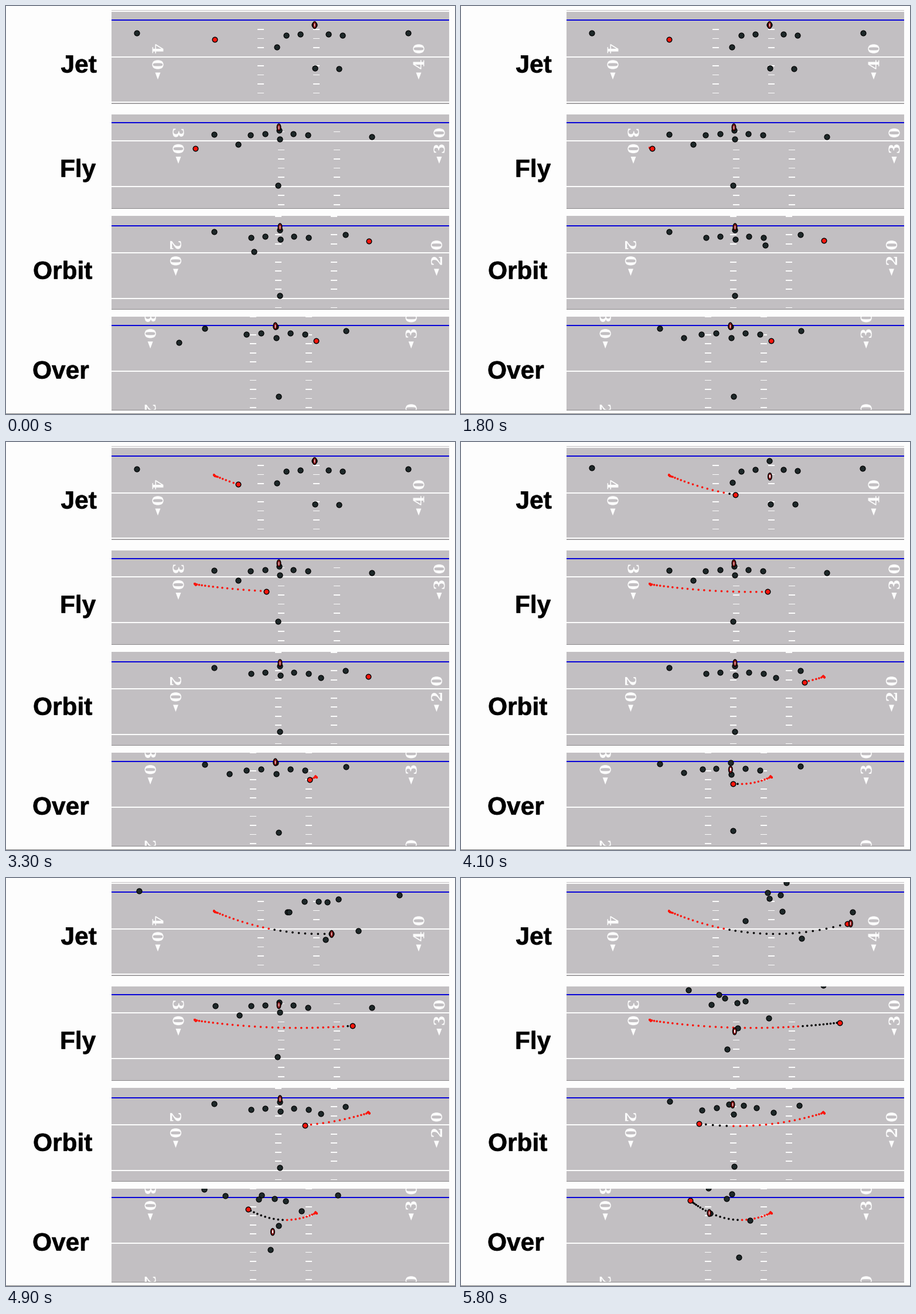
A matplotlib script that plays this animation: 766 by 696 pixels, repeating every 5.9 s.

```python
import numpy as np
import matplotlib.pyplot as plt
from matplotlib.animation import FuncAnimation
from matplotlib.patches import Ellipse, PathPatch, Polygon, Rectangle
from matplotlib.textpath import TextPath
from matplotlib.transforms import Affine2D

W, H, DPI = 766, 696, 64
FRAMES, INTERVAL = 59, 100
PT = 72 / DPI                      # points per pixel
LEFT, RIGHT = 179, 755
YARDS5 = 77.6                      # pixels between yard lines
GRASS, CHALK, BLUE = "#c2bfc2", "#fcfcfc", "#0a06d8"
RED, DARK, BROWN = "#fb160c", "#1e2829", "#8a1a1c"
SERIF = dict(family="DejaVu Serif", weight="bold")
SANS = dict(family="Liberation Sans", weight="bold")

plt.rcParams["toolbar"] = "None"
fig = plt.figure(figsize=(W / DPI, H / DPI), dpi=DPI, facecolor="#fdfdfd")
ax = fig.add_axes([0, 0, 1, 1])
ax.set(xlim=(-0.5, W - 0.5), ylim=(H - 0.5, -0.5))   # integers are pixel centres
ax.axis("off")


def add(patch, clip=None):
    ax.add_patch(patch)
    if clip is not None:
        patch.set_clip_path(clip)
    return patch


def box(x0, y0, x1, y1, color, z=1, clip=None):
    return add(Rectangle((x0, y0), x1 - x0, y1 - y0, fc=color, lw=0, zorder=z), clip)


def label(text, x, y):
    path = TextPath((0, 0), text, size=42.4, prop=SANS)
    tr = Affine2D().scale(1, -1).translate(x, y)
    add(PathPatch(path.transformed(tr), fc="black", ec="black", lw=0.7 * PT))


def digit(ch, x, y, angle, clip):
    path = TextPath((0, 0), ch, size=25.5, prop=SERIF)
    e = path.get_extents()
    tr = (Affine2D().translate(-(e.x0 + e.x1) / 2, -(e.y0 + e.y1) / 2)
          .scale(1, -1).rotate_deg(angle).translate(x, y))
    add(PathPatch(path.transformed(tr), fc=CHALK, lw=0, zorder=2), clip)


def arc(a, b, s, bow):
    """Points from a to b at progress s, sagging by bow halfway."""
    s = np.asarray(s)[..., None]
    return np.array(a) + s * np.subtract(b, a) + 4 * s * (1 - s) * np.array([0, bow])


class Play:
    def __init__(self, name, name_x, base, top, bottom, los, line, left, yard, snap):
        self.snap, self.men = snap, []
        label(name, name_x, base)
        self.clip = box(LEFT, top, RIGHT, bottom, GRASS, 0)
        self.field(top, bottom, line, left, yard)
        box(LEFT, los - 1, RIGHT, los + 1, BLUE, 3, self.clip)
        box(LEFT, bottom - 1, RIGHT, bottom, "#8c8a8c", 3)

        self.trail = self.dots(3.6, 0, 4)
        self.team = self.dots(9, 1.2, 5, DARK)
        self.runner = self.dots(8.6, 1.4, 6, RED)
        self.ball = add(Ellipse((0, 0), 6.6, 12, fc=BROWN, ec="black", lw=1.4 * PT,
                                zorder=7), self.clip)
        self.lace = box(0, 0, 1.4, 5, "white", 8, self.clip)

    def field(self, top, bottom, line, left, yard):
        for n in range(-15, 16):
            y = line + n * YARDS5 / 5
            if n % 5 == 0:
                box(LEFT, y - 1, RIGHT, y + 1, CHALK, 1, self.clip)
            elif top - 2 < y < bottom + 2:
                for x in (left + 175, left + 270):
                    box(x - 5.5, y - 0.9, x + 5.5, y + 0.9, CHALK, 1, self.clip)
        for k in (0, 1):
            y, tens = line + 2 * k * YARDS5, str(yard // 10 - k)
            for x, text, angle in ((left, tens + "0", 90), (left + 445, "0" + tens, -90)):
                digit(text[0], x, y - 13.5, angle, self.clip)
                digit(text[1], x, y + 13.5, angle, self.clip)
                add(Polygon([(x - 4.5, y + 27), (x + 4.5, y + 27), (x, y + 39)],
                            fc=CHALK, lw=0, zorder=2), self.clip)

    def dots(self, size, edge, z, color="black"):
        s = ax.scatter([], [], s=(size * PT) ** 2, c=color, linewidths=edge * PT,
                       edgecolors="black" if edge else "none", zorder=z)
        s.set_clip_path(self.clip)
        return s

    def man(self, spot, end, came_from=None, shift=1, bow=0):
        """Optional shift into the spot, then a burst towards end at the snap."""
        self.men.append((spot, end, came_from or spot, shift, bow))

    def line(self, cx, cy, gap, drop, ends):
        for k, end in zip(range(-2, 3), ends):
            depth = drop + 2 * (abs(k) - 1) if k else 0
            self.man((cx + k * gap, cy + depth), end)

    def motion(self, start, a, b, bow, ramp, tire=1e6):
        """Runner speeds up over ramp frames and fades after tire frames."""
        n = np.arange(FRAMES)
        t = np.maximum(n - start - 0.5, 0)
        dist = np.cumsum((1 - np.exp(-t / ramp)) * np.exp(-(t / tire) ** 3))
        s = dist / dist[-1]
        fidget = np.sin(n / 3)[:, None] * (s < 0.01)[:, None]
        self.path = arc(a, b, s, bow) + fidget

    def kick(self, *keys):
        t, x, y = np.transpose(keys)
        n = np.arange(FRAMES)
        self.ball_path = np.column_stack([np.interp(n, t, x), np.interp(n, t, y)])

    def place(self, man, n):
        spot, end, came_from, shift, bow = man
        u = min(n / shift, 1)
        burst = (max(n - self.snap + 1, 0) / (FRAMES - self.snap)) ** 1.7
        return arc(came_from, spot, u * u * (3 - 2 * u), bow) + burst * np.subtract(end, spot)

    def draw(self, n):
        self.team.set_offsets([self.place(m, n) for m in self.men])
        self.runner.set_offsets(self.path[n:n + 1])
        self.trail.set_offsets(self.path[:n + 1])
        self.trail.set_facecolor([RED if i < self.snap else "black" for i in range(n + 1)])
        x, y = self.ball_path[n]
        self.ball.set_center((x, y))
        self.lace.set_xy((x - 0.7, y - 2.5))


jet = Play("Jet", 93, 113, 6.5, 166.5, 23.2, 86, 258.5, 40, 40)
jet.line(525.5, 31, 24, 16.3, [(484.5, 72.5), (522.5, 24.5), (547, 56), (544.5, 28.5), (554, 7)])
jet.man((222.7, 45), (235, -24))
jet.man((461, 69), (525.5, 34.5))
jet.man((685.5, 45.6), (642, -6))
jet.man((526, 105.5), (580, 102.3))
jet.man((567, 106.5), (667, 57))
jet.motion(24, (355.2, 56.7), (658, 77.2), 27, ramp=9)
jet.kick((39, 526, 32), (44, 527, 98), (49, 555, 95), (54, 616, 91), (58, 664.3, 77))

fly = Play("Fly", 91.5, 291, 184.5, 345.5, 198, 229.5, 293.5, 30, 48)
fly.line(465.5, 211.3, 24.4, 5.8,
         [(439.5, 198.7), (449, 204.2), (470, 212.7), (484.3, 209.2), (524, 238.5)])
fly.man((354.3, 218.6), (387, 190.5))
fly.man((395.6, 235), (426.5, 215.7))
fly.man((623.7, 222.6), (617.3, 182))
fly.man((466, 226.5), (471.5, 255))
fly.man((463.5, 305.3), (453.7, 291))
fly.motion(16, (322.4, 242.3), (645.7, 246), 11, ramp=6.8, tire=44)
fly.kick((48, 465, 206.5), (51, 465, 236), (58, 466.3, 261))

orbit = Play("Orbit", 45.6, 465, 357, 517, 374.4, 420.8, 289, 20, 54)
orbit.line(466.3, 381.3, 24.6, 11.4,
           [(410.5, 395.6), (435.2, 391.8), (456.5, 385.5), (481, 387), (503, 391.8)])
orbit.man((354.3, 384), (355.3, 380))
orbit.man((467.7, 397.5), (464, 402))
orbit.man((578.7, 389.8), (576.5, 387))
orbit.man((536.2, 401.5), (532.2, 399), came_from=(422.7, 418.3), shift=24, bow=7)
orbit.man((466, 493), (465.2, 491.3))
orbit.motion(33.5, (618.6, 400), (405.2, 418.4), 11.7, ramp=8)
orbit.kick((55, 467, 376.5), (58, 463, 386))

over = Play("Over", 44.6, 635, 529, 689, 544.7, 544.8, 245.7, 30, 40)
over.line(459.7, 546, 25, 11, [(488, 504), (421, 528), (452.7, 546.6), (461, 538.6), (492, 583.5)])
over.man((338.5, 549.4), (337, 492))
over.man((380, 565.5), (362, 494), came_from=(294.2, 573.4), shift=19, bow=4)
over.man((460, 565), (473, 646.5))
over.man((579.5, 553.3), (539, 514))
over.man((464, 665), (424.8, 571))
over.motion(28.5, (528.5, 570.8), (390, 549.3), 21.5, ramp=11, tire=21)
over.kick((39, 459, 545.6), (45, 460, 584), (50, 453, 608), (58, 423, 571))

box(-1, 694.5, W, 695.5, "#808080")
plays = (jet, fly, orbit, over)


def update(n):
    for p in plays:
        p.draw(n)
    return []


anim = FuncAnimation(fig, update, frames=FRAMES, interval=INTERVAL,
                     init_func=lambda: update(0), repeat=True, blit=False)
plt.show()
```
